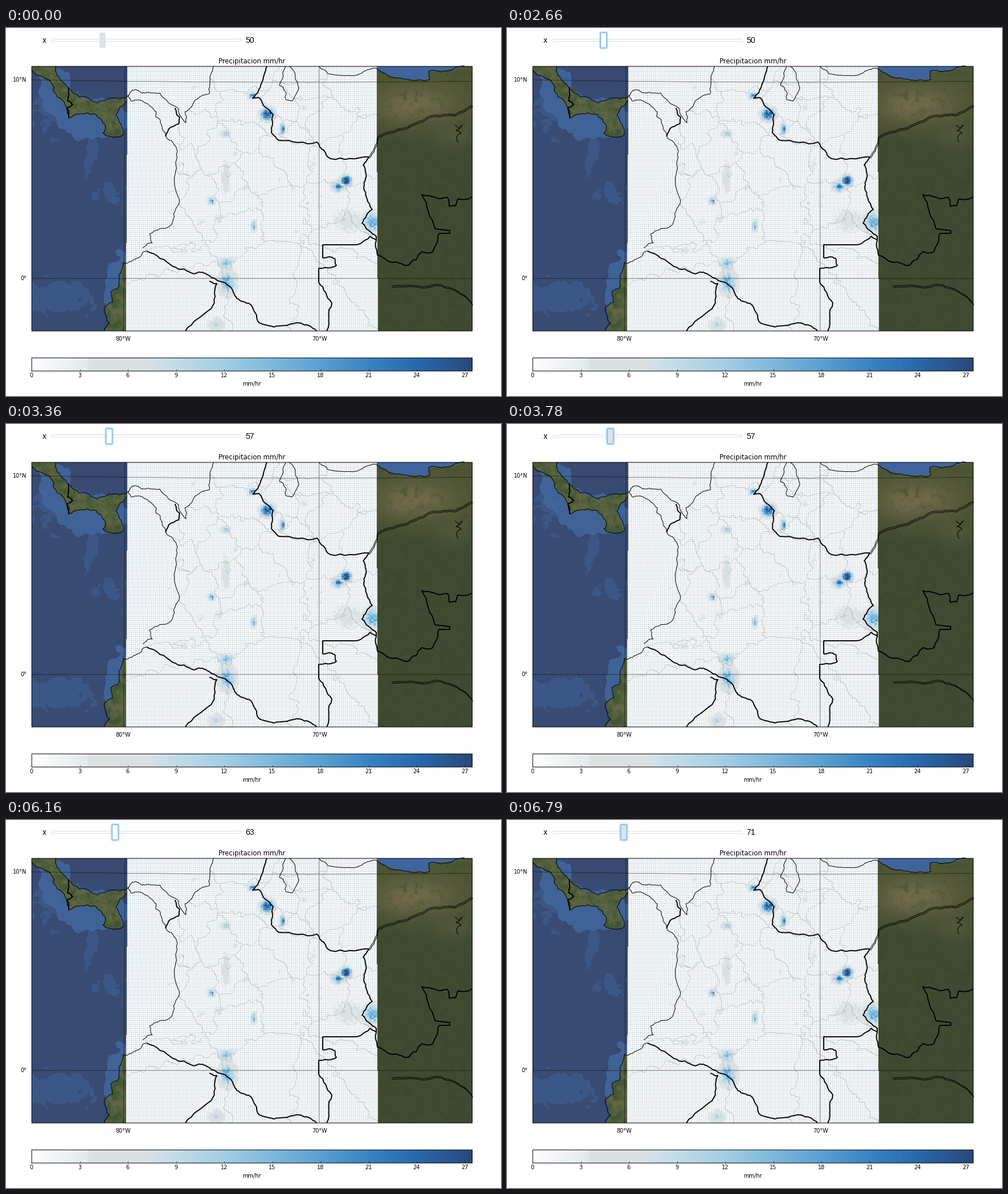
A matplotlib script for the animation above (8 s loop, 869 by 645 pixels).

```python
import numpy as np
import matplotlib.pyplot as plt
from matplotlib.animation import FuncAnimation
from matplotlib.collections import LineCollection
from matplotlib.patches import FancyBboxPatch, Rectangle
from matplotlib.path import Path

W, H, DPI = 869, 645, 64
LOOP, STEP = 8000, 20
L, R, T, B = 45, 819, 67, 531          # map frame
CELL = 3.48                            # one tenth of a degree in pixels
PT = 72 / DPI

rng = np.random.default_rng(7)
yy, xx = np.mgrid[0:H, 0:W].astype(float)


def noise(size):
    """Smooth value noise between -0.5 and 0.5 over the whole stage."""
    g = rng.random((H // size + 2, W // size + 2)) - 0.5
    y, x = np.arange(H) / size, np.arange(W) / size
    i, j = y.astype(int), x.astype(int)
    fy, fx = (y - i)[:, None], (x - j)[None, :]
    fy, fx = fy * fy * (3 - 2 * fy), fx * fx * (3 - 2 * fx)
    top = g[i][:, j] * (1 - fx) + g[i][:, j + 1] * fx
    low = g[i + 1][:, j] * (1 - fx) + g[i + 1][:, j + 1] * fx
    return top * (1 - fy) + low * fy


warp_x = noise(14) + 0.5 * noise(6)
warp_y = noise(14) + 0.5 * noise(6)
grain = noise(9) + 0.6 * noise(4) + 0.4 * noise(2)


def pts(*flat):
    return np.array(flat, float).reshape(-1, 2)


def inside(points, wobble=0):
    where = np.column_stack(((xx + wobble * warp_x).ravel(),
                             (yy + wobble * warp_y).ravel()))
    return Path(points).contains_points(where).reshape(H, W)


def bump(x, y, cx, cy, rx, ry):
    return np.exp(-((x - cx) / rx) ** 2 - ((y - cy) / ry) ** 2)


def blend(img, color, amount):
    amount = np.clip(amount, 0, 1)[..., None]
    img += (np.array(color, float) - img) * amount


def rough(points, amp=0.15, passes=3):
    """Midpoint displacement that makes a coarse path look surveyed."""
    p = points
    for _ in range(passes):
        d = np.diff(p, axis=0)
        size = np.hypot(*d.T)[:, None] + 1e-9
        normal = np.column_stack((-d[:, 1], d[:, 0])) / size
        shift = rng.uniform(-1, 1, (len(d), 1)) * np.minimum(size, 24) * amp
        out = np.empty((2 * len(p) - 1, 2))
        out[0::2] = p
        out[1::2] = (p[1:] + p[:-1]) / 2 + normal * shift
        p = out
    return p


# ---- key points of coasts and borders ------------------------------------
isthmus_north = pts(87, 67, 91, 84, 108, 104, 130, 121, 160, 131, 195, 123, 212, 121)
isthmus_south = pts(45, 74, 80, 97, 84, 112, 109, 143, 110, 158, 128, 151, 158, 151,
                    175, 171, 170, 184, 182, 190, 206, 187, 193, 152, 212, 127)
gulf = pts(212, 121, 226, 108, 243, 114, 270, 114, 303, 142, 306, 154, 316, 166,
           314, 147, 345, 118, 357, 115, 358, 85, 364, 67)
bay = pts(214, 117, 220, 128, 240, 128, 264, 147, 263, 156, 271, 162, 281, 190)
pacific = pts(281, 190, 301, 216, 297, 256, 304, 308, 290, 345, 252, 361, 257, 377, 240, 385)
south_coast = pts(247, 391, 234, 402, 206, 411, 196, 457, 184, 462, 187, 480,
                  174, 488, 182, 517, 172, 531)
lagoon = pts(491, 67, 480, 100, 491, 112, 491, 125, 502, 128, 514, 105, 497, 67)
north_shore = pts(550, 67, 565, 80, 622, 80, 650, 71, 682, 87, 705, 90, 744, 90,
                  742, 76, 785, 72, 805, 67)
big_river = pts(637, 226, 652, 191, 710, 170, 750, 153, 786, 152, 819, 135)
low_river = pts(677, 452, 765, 450, 795, 463, 819, 483)
reservoir = pts(788, 170, 796, 176, 801, 170, 790, 180, 799, 184, 791, 190, 794, 201)

borders = [
    pts(110, 104, 108, 128, 117, 134, 107, 140, 110, 158),
    pts(297, 140, 305, 157, 303, 168, 285, 178, 280, 190),
    pts(458, 67, 447, 100, 433, 123, 444, 122, 469, 152, 466, 183, 480, 197,
        546, 200, 570, 229, 637, 226, 627, 240, 632, 262, 628, 278, 643, 318,
        625, 342, 650, 365, 652, 398, 678, 411, 706, 416, 730, 392, 748, 393, 760, 360),
    pts(650, 372, 640, 365, 622, 378, 613, 380),
    pts(556, 403, 577, 404, 580, 416, 549, 421),
    pts(549, 446, 572, 482, 563, 531),
    pts(247, 391, 293, 418, 330, 431, 345, 428, 368, 440, 395, 455, 405, 474,
        432, 488, 442, 514, 470, 524, 516, 517, 545, 531),
    pts(357, 444, 370, 448, 360, 492, 315, 531),
    pts(753, 352, 730, 292, 775, 297, 778, 312, 789, 312, 793, 300, 819, 296),
]
straight_borders = [
    pts(613, 380, 556, 380, 556, 403),
    pts(549, 421, 549, 446),
    pts(760, 360, 779, 360, 779, 355, 753, 352),
]

# ---- raster: sea and land ------------------------------------------------
img = np.full((H, W, 3), 255.0)
frame = (xx >= L) & (xx < R) & (yy >= T) & (yy < B)
img[frame] = (56, 75, 114)

west = frame & (xx < 216)
ridges = (0.6 * bump(xx, yy, 70, 150, 60, 50) + bump(xx, yy, 148, 215, 14, 40)
          + 0.8 * bump(xx, yy, 180, 292, 32, 20) + bump(xx, yy, 85, 470, 75, 35))
blend(img, (61, 91, 140), 0.75 * (west & (ridges + 0.7 * warp_x > 0.55)))
shelf = (bump(xx, yy, 155, 160, 75, 42) + bump(xx, yy, 85, 100, 32, 40)
         + bump(xx, yy, 205, 470, 40, 95))
blend(img, (66, 104, 158), 0.85 * (west & (shelf + 0.2 * warp_y > 0.5)))
deep = (xx > 112) & (yy < 112)
blend(img, (56, 74, 112), 1.0 * (west & deep))

isthmus = np.vstack((isthmus_north, isthmus_south[::-1], pts(45, 60, 87, 60)))
corner = np.vstack((south_coast[2:], pts(172, 540, 216, 540, 216, 411)))
for poly in (isthmus, corner):
    land = inside(poly, 2) & frame
    blend(img, (74, 92, 56), 1.0 * land)
    blend(img, (116, 112, 80), land * (0.2 + 0.7 * grain))
    blend(img, (48, 70, 42), land * -0.6 * grain)

east = frame & (xx > 640)
blend(img, (64, 76, 50), 1.0 * east)
blend(img, (78, 86, 52), east * np.clip((205 - yy) / 60, 0, 1))
dry_land = (bump(xx, yy, 695, 135, 48, 34) + 0.7 * bump(xx, yy, 755, 130, 45, 32)
            + 0.4 * bump(xx, yy, 785, 190, 32, 22))
blend(img, (130, 116, 86), east * dry_land * (0.6 + 0.8 * grain))
blend(img, (50, 66, 40), east * (0.08 + 0.35 * grain))
sea_north = np.vstack((north_shore[3:], pts(795, 60, 655, 60)))
blend(img, (64, 100, 156), 1.0 * (inside(sea_north, 2) & frame))

# ---- raster: rain cells and provinces ------------------------------------
# x, y, radius x, radius y, peak
storms = [
    (459, 151, 10, 9, 29), (432, 118, 7, 5, 21), (485, 177, 4, 8, 23),
    (384, 186, 8, 5, 14), (386, 262, 7, 28, 8), (361, 303, 6, 6, 18),
    (435, 347, 4, 8, 18), (597, 267, 7, 7, 36), (582, 278, 9, 7, 22),
    (643, 340, 15, 16, 17), (600, 338, 32, 24, 5.5), (386, 412, 10, 8, 18),
    (388, 446, 14, 18, 16), (370, 521, 13, 11, 10),
]
specks = [(x, y, 2, 2, p) for x, y, p in
          rng.uniform((240, 230, 8), (590, 450, 14), (9, 3))]
showers = [(x, y, r, r, 4.5) for x, y, r in
           rng.uniform((260, 80, 5), (640, 400, 11), (10, 3))]

LEVELS = [0, 3.4, 3.6, 7.2, 7.5, 12, 18, 21, 24, 27.5]
SHADES = np.array([(253, 254, 255), (230, 237, 238), (221, 226, 226), (219, 225, 226),
                   (211, 226, 235), (163, 208, 231), (92, 164, 214), (58, 136, 201),
                   (42, 110, 181), (44, 78, 132)])


def shade(v):
    return np.stack([np.interp(v, LEVELS, band) for band in SHADES.T], -1)


COLS, ROWS = 127, int((B - T) / CELL) + 1
slope = (yy - T) / (B - T)
left, right = 213 - 3 * slope, 650 + 2.5 * slope
col = np.floor((xx - left) / (right - left) * COLS).astype(int)
row = np.floor((yy - T) / CELL).astype(int)
mesh = frame & (col >= 0) & (col < COLS)

cy, cx = np.mgrid[0:ROWS, 0:COLS] + 0.5
cx, cy = 212 + cx * 439 / COLS, T + cy * CELL
rain = np.zeros((ROWS, COLS))
for x, y, rx, ry, peak in storms + specks + showers:
    core = 0.8 * bump(cx, cy, x, y, rx, ry)
    halo = 0.25 * bump(cx, cy, x, y, 1.9 * rx, 1.9 * ry)
    rain = np.maximum(rain, peak * (core + halo) * rng.uniform(0.65, 1.15, rain.shape))

value = rain[row.clip(0, ROWS - 1), col.clip(0, COLS - 1)]
seam = (col != np.roll(col, 1, 1)) | (row != np.roll(row, 1, 0))
dry_cell = np.where(seam[..., None], (251, 252, 253), (220, 228, 231))
img[mesh] = np.where((value > 2.6)[..., None], shade(value), dry_cell)[mesh]

# provinces are the nearest-site regions of scattered towns
best = np.full((H, W), np.inf)
owner = np.zeros((H, W), int)
for k, (x, y) in enumerate(rng.uniform((215, 70), (650, 470), (48, 2))):
    d = np.hypot(xx + 16 * warp_x - x, yy + 16 * warp_y - y)
    owner[d < best] = k
    best = np.minimum(best, d)
edge = (owner != np.roll(owner, 1, 1)) | (owner != np.roll(owner, 1, 0))
mainland = np.vstack((gulf[:-6:-1], pacific, south_coast, pts(172, 540, 660, 540, 660, 60)))
blend(img, (120, 126, 128), 0.33 * (edge & mesh & inside(mainland)))

# ---- raster: colour scale ------------------------------------------------
scale = (np.arange(L, R) - L) / 84.5 * 3
stripe = (np.arange(R - L) % (774 / 256)) < 1
depth = np.interp(scale, [1, 3.3, 3.7, 12, 18, 24, 27], [0, .04, .01, .02, .06, .14, .2])
img[578:601, L:R] = shade(scale) * (1 - depth * stripe)[:, None]

# ---- figure --------------------------------------------------------------
fig = plt.figure(figsize=(W / DPI, H / DPI), dpi=DPI, facecolor="white")
fig.figimage(img.clip(0, 255).astype(np.uint8), zorder=-1)
ax = fig.add_axes([0, 0, 1, 1])
ax.set(xlim=(0, W), ylim=(H, 0))
ax.axis("off")


def lines(paths, width, color="black", **kw):
    ax.add_collection(LineCollection(paths, colors=color, linewidths=width * PT, **kw))


def label(x, y, text, size=9.7, ha="center", font="DejaVu Sans"):
    return ax.text(x, y, text, fontsize=size * PT, ha=ha, va="baseline",
                   family=font, color="black")


coasts = [isthmus_north, isthmus_south, gulf, bay, pacific, south_coast,
          lagoon, north_shore, reservoir]
lines([rough(p) for p in coasts], 1.0)
for river in (big_river, low_river):
    bank = rough(river, 0.1)
    lines([bank, bank + (1, 2.5)], 1.0)
lines([rough(p, 0.12) for p in borders] + straight_borders, 1.9, joinstyle="round")

gx = np.linspace(L, R, 40)
parallel = np.column_stack((gx, 95 - 4.2 * ((gx - 520) / 475) ** 2))
lines([parallel, pts(L, 439, R, 439), pts(209, T, 206.5, B), pts(549.8, T, 549.8, B)],
      0.6, alpha=0.8, snap=False)

for top, bottom in ((67.2, 531), (578.2, 601.2)):
    ax.add_patch(Rectangle((45.2, top), 773.3, bottom - top, fill=False,
                           ec="black", lw=PT, snap=False))
for k in range(10):
    x = 45.2 + 84.5 * k
    lines([pts(x, 597.5, x, 601)], 0.6)
    label(x - 0.3, 612.5, str(3 * k))

label(431.5, 62, "Precipitacion mm/hr", 11.64)
label(431.5, 626.5, "mm/hr")
label(206, 548, "80°W")
label(550.5, 548, "70°W")
label(36, 94, "10°N", ha="right")
label(36, 442.3, "0°", ha="right")

# ---- slider --------------------------------------------------------------
MIDY = 21.5
BLUE, GREY = "#7dbcec", "#dde3e6"


def box(x, w, h, radius, **kw):
    style = f"round,pad=0,rounding_size={radius}"
    patch = FancyBboxPatch((x, MIDY - h / 2), w, h, boxstyle=style, **kw)
    return ax.add_patch(patch)


label(64, 26, "x", 14, "left", "Liberation Sans")
readout = label(420.7, 26, "50", 14, "left", "Liberation Sans")
box(79, 334, 4, 2, fc="#fbfcfc", ec="#dde2e4", lw=PT)

glow = [box(0, 11 + 2 * g, 27 + 2 * g, 2 + g, fc="#66afe9", lw=0, alpha=a)
        for g, a in ((3, 0.12), (2, 0.25), (1, 0.45))]
rim = box(0, 11, 27, 2, lw=0)
core = box(0, 9, 25, 1, lw=0)

FOCUS, TICK = 770, 70
PRESSES = [(2660, 3780), (5600, 6790)]
# start, end, first value, last value, ease-out power
DRAGS = [(2940, 3430, 48, 57, 2.1), (5600, 5670, 58.6, 58.6, 1), (6090, 6440, 60, 71, 1.5)]


def slider_value(t):
    value = 50
    for start, end, a, b, power in DRAGS:
        if t >= start:
            u = min(1, (t - start) // TICK * TICK / (end - start))
            value = a + (b - a) * (1 - (1 - u) ** power)
    return value


def update(n):
    t = n * STEP + STEP / 2
    value = slider_value(t)
    center = 169.5 + 1.69 * (value - 50)
    focused = t >= FOCUS
    held = any(a <= t < b for a, b in PRESSES)
    readout.set_text(f"{value:.0f}")
    for patch in (*glow, rim, core):
        patch.set_x(center - patch.get_width() / 2)
    for patch in glow:
        patch.set_visible(focused)
    rim.set_facecolor(BLUE if focused else GREY)
    core.set_facecolor("white" if held else GREY)
    return (*glow, rim, core, readout)


anim = FuncAnimation(fig, update, frames=LOOP // STEP, interval=STEP,
                     init_func=lambda: update(0), repeat=True, repeat_delay=0)
plt.show()
```
